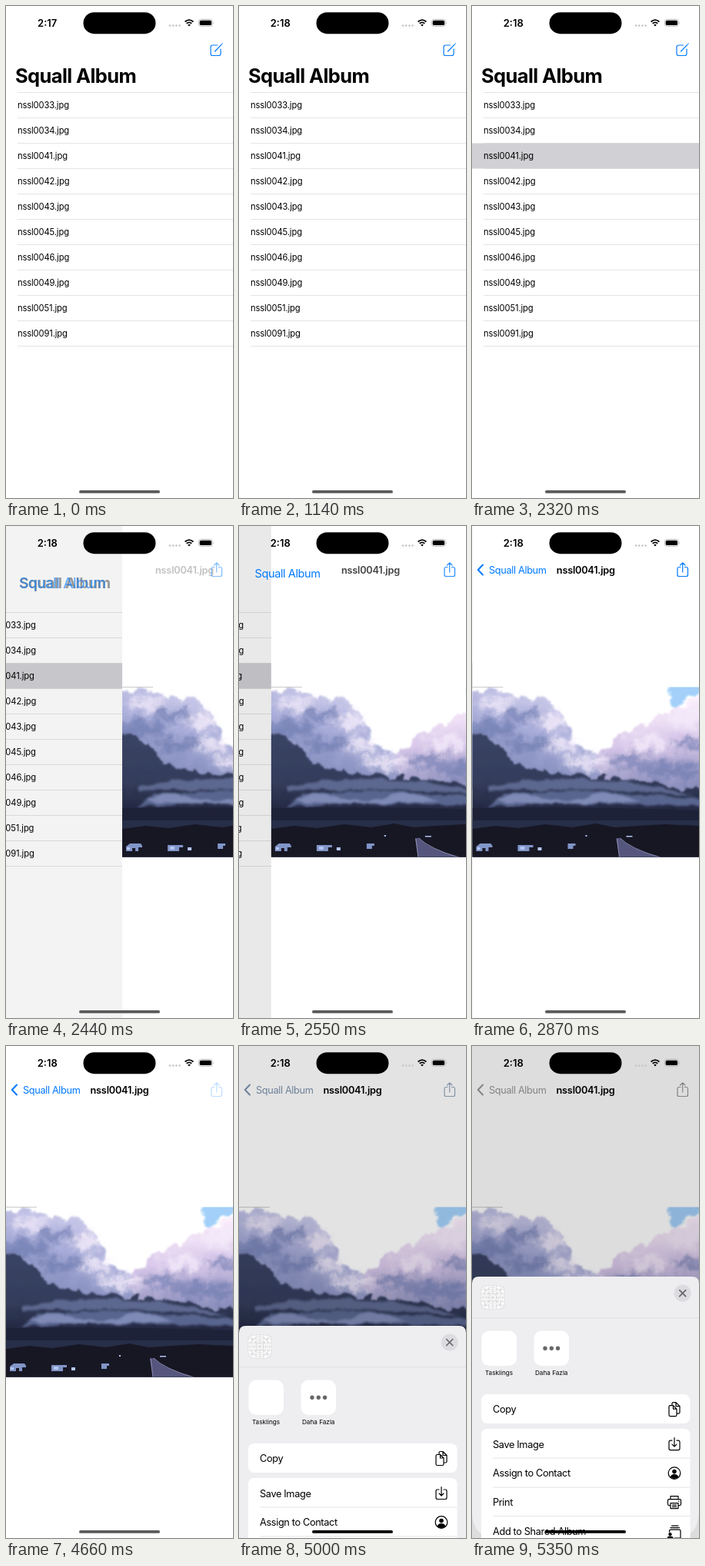
Write an HTML page that moves like this. It is 295 px wide and 640 px high and loops after 8000 ms.

```html
<!DOCTYPE html>
<html lang="en">
<head>
<meta charset="utf-8">
<title>Photo list and share sheet</title>
<style>
  html, body { margin: 0; height: 100%; overflow: hidden; background: #fff; }
  svg { display: block; width: 100%; height: 100%; }
  text { font: 400 12.75px Inter, sans-serif; letter-spacing: -.36px; }
  .row { font-size: 11.2px; letter-spacing: -.13px; }
  .semi { font-weight: 600; letter-spacing: -.24px; }
  .large { font-weight: 700; font-size: 25.5px; letter-spacing: -.6px; }
  .app { font-size: 8.2px; letter-spacing: 0; }
  .mid { text-anchor: middle; }
  .line { fill: none; stroke: currentColor; stroke-width: 1.2; stroke-linecap: round; stroke-linejoin: round; }
  .hair { fill: none; stroke: #d9d9db; stroke-width: .7; }
  #nav { color: #007aff; }
</style>
</head>
<body>
<svg viewBox="0 0 295 640" preserveAspectRatio="none">
  <defs>
    <clipPath id="frame"><rect y="209.400" width="295" height="221.200"/></clipPath>
    <filter id="billow" filterUnits="userSpaceOnUse" x="-30" y="180" width="355" height="280">
      <feTurbulence type="fractalNoise" baseFrequency=".06" numOctaves="5" seed="4"/>
      <feDisplacementMap in="SourceGraphic" scale="20" xChannelSelector="R" yChannelSelector="G"/>
      <feGaussianBlur stdDeviation="1"/>
    </filter>
    <filter id="puff" filterUnits="userSpaceOnUse" x="-30" y="180" width="355" height="280">
      <feGaussianBlur stdDeviation="5" result="blur"/>
      <feTurbulence type="fractalNoise" baseFrequency=".07" numOctaves="5" seed="9"/>
      <feDisplacementMap in="blur" scale="26" xChannelSelector="R" yChannelSelector="G"/>
    </filter>
    <filter id="haze" filterUnits="userSpaceOnUse" x="-30" y="180" width="355" height="280">
      <feTurbulence type="fractalNoise" baseFrequency=".05" numOctaves="4" seed="2"/>
      <feDisplacementMap in="SourceGraphic" scale="8" xChannelSelector="R" yChannelSelector="G"/>
      <feGaussianBlur stdDeviation="1.600"/>
    </filter>
    <linearGradient id="leftCloud" gradientUnits="userSpaceOnUse" x1="90" y1="215" x2="60" y2="315">
      <stop stop-color="#cfcdec"/><stop offset=".5" stop-color="#a9add9"/><stop offset="1" stop-color="#868fbe"/>
    </linearGradient>
    <linearGradient id="rightCloud" gradientUnits="userSpaceOnUse" x1="230" y1="235" x2="240" y2="340">
      <stop stop-color="#fbeefc"/><stop offset=".45" stop-color="#d9c8ea"/><stop offset="1" stop-color="#8d90bd"/>
    </linearGradient>
    <linearGradient id="shelf" gradientUnits="userSpaceOnUse" x1="0" y1="275" x2="0" y2="385">
      <stop stop-color="#3a4364"/><stop offset=".5" stop-color="#343d5c"/><stop offset="1" stop-color="#1d2138"/>
    </linearGradient>
  </defs>

  <g id="list">
    <rect width="295" height="640" fill="#fff"/>
    <g id="rows"></g>
  </g>
  <rect id="listDim" width="295" height="640"/>

  <g id="detail">
    <rect width="295" height="640" fill="#fff"/>
    <g clip-path="url(#frame)">
      <g filter="url(#billow)">
        <path d="M255 195H325V216L286 220 273 228 266 241 253 237Z" fill="#a3d0f9"/>
        <path d="M-30 216 30 214 60 222 100 223 108 238 126 260 130 284 160 295 190 320 200 345H-30Z" fill="url(#leftCloud)"/>
        <path d="M160 296 180 284 200 268 232 254 262 241 282 226 325 218V350H165Z" fill="url(#rightCloud)"/>
      </g>
      <g filter="url(#puff)">
        <g fill="#6f7bb0" opacity=".75">
          <ellipse cx="22" cy="264" rx="34" ry="12"/><ellipse cx="72" cy="284" rx="28" ry="9"/>
          <ellipse cx="66" cy="246" rx="26" ry="7"/><ellipse cx="262" cy="318" rx="46" ry="10"/>
          <ellipse cx="205" cy="306" rx="28" ry="7"/><ellipse cx="280" cy="284" rx="24" ry="6"/>
        </g>
        <g fill="#f4ecfb" opacity=".85">
          <ellipse cx="104" cy="254" rx="16" ry="12"/><ellipse cx="30" cy="232" rx="26" ry="7"/>
          <ellipse cx="118" cy="284" rx="18" ry="9"/><ellipse cx="148" cy="306" rx="34" ry="8"/>
          <ellipse cx="228" cy="282" rx="28" ry="9"/><ellipse cx="282" cy="250" rx="22" ry="12"/>
        </g>
      </g>
      <path filter="url(#billow)" d="M-30 280 20 274 32 284 44 300 64 312 110 322 160 328 200 328 240 336 325 346V460H-30Z" fill="url(#shelf)"/>
      <g filter="url(#haze)">
        <path d="M20 340Q70 328 140 329T290 350Q180 340 20 344Z" fill="#5d6890"/>
        <path d="M40 349Q110 342 180 346T295 354L320 366Q160 358 20 364Z" fill="#59658e"/>
        <path d="M46 350Q70 344 96 354T150 352T220 358Q120 364 30 358Z" fill="#7f8ab6"/>
      </g>
      <path d="M0 367Q150 364 295 370V431H0Z" fill="#1e2238"/>
      <path d="M0 383H295V394H0Z" fill="#272e48"/>
      <path d="M0 394 30 390 60 393 95 388 130 392 160 387 185 392 215 390 250 388 295 390V431H0Z" fill="#171724"/>
      <path d="M187 406H192Q206 421 246 431H191Z" fill="#55567e"/>
      <path d="M188 407 191 431M192 406Q206 420 244 431" fill="none" stroke="#a09fc6" stroke-width=".8"/>
      <path d="M5 417 10 413H24L26 416V418H21V423H17V419H13V423H5ZM59 415H79V418H74V423H59ZM124 413H134V416H131V420H124Z" fill="#8195c8"/>
      <path d="M62 417h6v4h-6zM6 418h4v3h-4zM85 418h5v4h-5zM147 402h2v2h-2zM200 403h8v1.500h-8z" fill="#b4c6f0"/>
      <path d="M0 209.600H40" stroke="#555" stroke-width=".6"/>
    </g>
  </g>

  <g id="nav">
    <text id="large" class="large">Squall Album</text>
    <text id="back" fill="currentColor">Squall Album</text>
    <path id="chevron" class="line" style="stroke-width:2" d="M14 50.500 7.800 57 14 63.500"/>
    <text id="title" class="semi mid" x="147.500" y="61.500">nssl0041.jpg</text>
    <path id="compose" class="line" d="M274.500 51H268.500Q266 51 266 53.500V62Q266 64.500 268.500 64.500H276.500Q279 64.500 279 62V56M272 58.500 280 50.200M272 58.500 271.500 59M281 49.200 281.300 48.900"/>
    <path id="share" class="line" d="M271 53.500H269Q267 53.500 267 55.500V63.500Q267 65.500 269 65.500H278.500Q280.500 65.500 280.500 63.500V55.500Q280.500 53.500 278.500 53.500H276.500M273.700 60V47.800M270.500 51 273.700 47.800 277 51"/>
  </g>
  <rect id="dim" width="295" height="640"/>

  <g id="status">
    <text id="clock" class="semi mid" x="53.700" y="26.500" style="font-size:13px;letter-spacing:0"></text>
    <rect x="100.500" y="8.200" width="94" height="28" rx="14"/>
    <path d="M213 25.500H226" stroke="#c4c4c6" stroke-width="2.600" stroke-linecap="round" stroke-dasharray="0 4.200"/>
    <path d="M232.600 20.500Q238 15.700 243.400 20.500M234.700 22.800Q238 19.900 241.300 22.800" fill="none" stroke="#000" stroke-width="1.800"/>
    <path d="M236.200 24.500Q238 23 239.800 24.500L238 26.500Z"/>
    <rect x="250.400" y="17.400" width="18" height="9" rx="3" fill="none" stroke="#aaa" stroke-width=".8"/>
    <rect x="251.700" y="18.700" width="15.400" height="6.400" rx="1.900"/>
    <path d="M269.600 20.500Q271 22 269.600 23.500Z" fill="#aaa"/>
  </g>

  <!-- Share sheet, drawn with its top edge at y = 0 -->
  <g id="sheet">
    <path d="M0 9Q0 0 9 0H286Q295 0 295 9V305Q295 341 259 341H36Q0 341 0 305Z" fill="#eeeef1"/>
    <rect x="12" y="12" width="30" height="30" rx="6" fill="#fff" stroke="#d4d4d6" stroke-width=".6"/>
    <g class="hair" style="stroke:#c4c4c8;stroke-width:.5">
      <path d="M17 12V42M22 12V42M27 12V42M32 12V42M37 12V42M12 17H42M12 22H42M12 27H42M12 32H42M12 37H42M13 13 41 41M41 13 13 41"/>
      <circle cx="27" cy="27" r="5"/><circle cx="27" cy="27" r="8"/><circle cx="27" cy="27" r="13"/>
    </g>
    <circle cx="273.700" cy="21.500" r="11" fill="#dcdce0"/>
    <path class="line" style="color:#66666b;stroke-width:1.700" d="M269.700 17.500 277.700 25.500M277.700 17.500 269.700 25.500"/>
    <path class="hair" d="M0 53.700H295"/>
    <g fill="#fff">
      <rect x="12.500" y="70.500" width="45.500" height="45.500" rx="10"/>
      <rect x="80.500" y="70.500" width="45.500" height="45.500" rx="10"/>
      <rect x="12" y="153" width="271.500" height="38" rx="8"/>
      <path d="M12 206Q12 198 20 198H275.500Q283.500 198 283.500 206V341H12Z"/>
    </g>
    <path d="M95 93.200H112" stroke="#666" stroke-width="5.400" stroke-linecap="round" stroke-dasharray="0 8.300"/>
    <text class="app mid" x="35" y="127.500">Tasklings</text>
    <text class="app mid" x="103.200" y="127.500">Daha Fazla</text>
    <path class="hair" d="M27 236H283.500M27 274H283.500M27 311.500H283.500"/>
    <g id="actions"></g>
  </g>
  <rect id="home" x="95" y="630" width="105" height="3.800" rx="1.900"/>
</svg>

<script>
const $ = id => document.getElementById(id);
const clamp = v => Math.min(1, Math.max(0, v));
const set = (id, attrs) => {
  for (const key in attrs) $(id).setAttribute(key, attrs[key]);
};

const files = ['0033', '0034', '0041', '0042', '0043', '0045', '0046', '0049', '0051', '0091'];
$('rows').innerHTML = '<path class="hair" d="M15 112.5H295"/>' + files.map((number, i) => `
  <path class="hair" d="M15 ${145.5 + 33 * i}H295"/>
  ${number === '0041' ? '<rect id="selected" y="178.5" width="295" height="33" fill="#d1d1d5"/>' : ''}
  <text class="row" x="15" y="${133 + 33 * i}">nssl${number}.jpg</text>`).join('');

// Icons are centred on 0,0
const actions = [
  ['Copy', 172.5, '<path d="M-3-5V-7.500Q-3-9-1.500-9H2L7-4V4Q7 5.500 5.500 5.500H3.500M2-9V-4H7M-7-3.500Q-7-5-5.500-5H-1.500L3-.500V7.500Q3 9 1.500 9H-5.500Q-7 9-7 7.500ZM-1.500-5V-.500H3"/>'],
  ['Save Image', 218, '<path d="M-3-5H-5Q-7-5-7-3V5.500Q-7 7.500-5 7.500H5Q7 7.500 7 5.500V-3Q7-5 5-5H3M0-8.500V3M-3 0 0 3 3 0"/>'],
  ['Assign to Contact', 255.5, '<circle r="7.800"/><g fill="#000"><circle cy="-2" r="2.200"/><path d="M-4.500 5Q-4 2 0 2T4.500 5Q0 8.500-4.500 5Z"/></g>'],
  ['Print', 293.5, '<path d="M-5-4V-8H5V-4M-5 4H-7Q-8.500 4-8.500 2.500V-2.500Q-8.500-4-7-4H7Q8.500-4 8.500-2.500V2.500Q8.500 4 7 4H5M-5 1H5V8H-5ZM-2.500 3.500H2.500M-2.500 5.800H2.500M5.500-1.500H6"/>'],
  ['Add to Shared Album', 331, '<path d="M-3.500-7H5M-5-4.500H6.500M-6.500 1V0Q-6.500-2-4.500-2H6Q8-2 8 0V9H0"/><g fill="#000"><circle cx="-5.500" cy="4" r="1.600"/><path d="M-9 9Q-8.500 7-5.500 7T-2 9Z"/></g>'],
];
$('actions').innerHTML = actions.map(([label, y, icon]) => `
  <text x="27" y="${y + 4.5}">${label}</text>
  <g class="line" transform="translate(263 ${y})">${icon}</g>`).join('');

// The screen refreshes only at these moments
const ticks = [0, 1140, 2320, 2440, 2550, 2660, 2770, 2870, 4660, 4780, 4890, 5000, 5110, 5230, 5350];

// Critically damped spring from 0 to 1
function spring(ms, speed) {
  const x = Math.max(0, ms) / 1000 * speed;
  return 1 - (1 + x) * Math.exp(-x);
}

function draw(time) {
  const t = ticks.findLast(tick => tick <= time);
  const push = spring(t - 2340, 16.4);
  const rest = 1 - push;
  const rise = spring(t - 4780, 13.9);

  $('clock').textContent = t < 1140 ? '2:17' : '2:18';
  set('selected', { opacity: t < 2320 ? 0 : 1 });
  set('list', { transform: `translate(${-88.5 * push})` });
  set('listDim', { opacity: .1 * push });
  set('detail', { transform: `translate(${295 * rest})` });

  // The large title shrinks into the back button
  const place = `translate(${22 - 10 * rest} ${61.5 + 38.5 * rest})`;
  set('large', { transform: `${place} scale(${.5 + .5 * rest})`, opacity: clamp(1 - 1.3 * push) });
  set('back', { transform: `${place} scale(${1 + rest})`, opacity: clamp(1.3 * push) });
  set('chevron', { opacity: clamp(8 * push - 7) });
  set('title', { transform: `translate(${165 * rest})`, opacity: push ** 2 });
  set('compose', { opacity: clamp(1 - 2 * push) });

  const pressed = t < 4660 ? 1 : clamp(.25 + (t - 4660) / 600);
  set('share', { opacity: push * pressed });
  $('nav').style.color = `color-mix(in srgb, #007aff, #98989b ${100 * rise}%)`;

  set('dim', { opacity: .135 * rise });
  set('sheet', { transform: `translate(0 ${640 - 341 * rise})` });
  set('home', { fill: rise > 0 ? '#000' : '#5a5a5a' });
}

function frame() {
  draw(performance.now() % 8000);
  requestAnimationFrame(frame);
}
frame();
</script>
</body>
</html>
```
